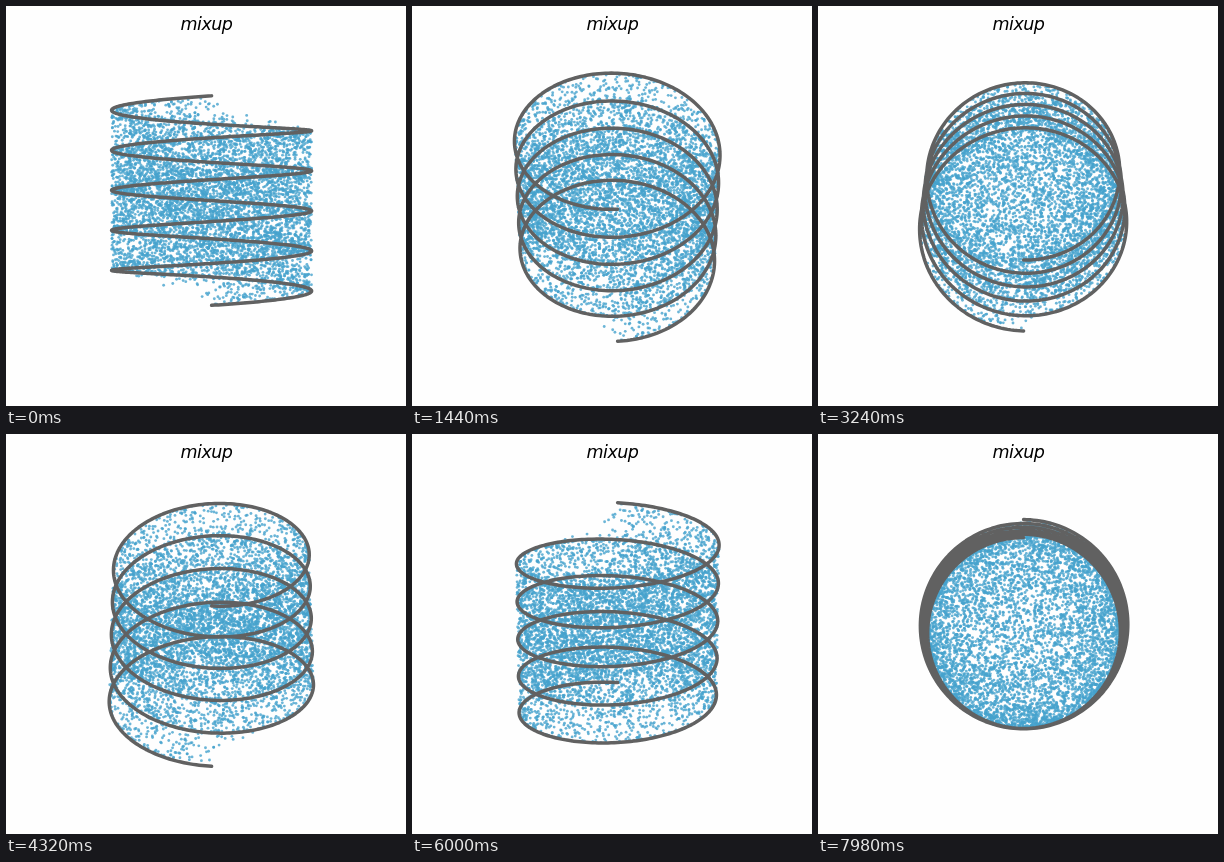
Recreate the animation shown at these times as an HTML page with a canvas. Size 400 by 400 pixels, loop 8000 ms.

```html
<!DOCTYPE html>
<html>
<head>
<meta charset="utf-8">
<title>mixup</title>
<style>
  html, body { margin: 0; width: 100%; height: 100%; overflow: hidden; background: #fefefe; }
  canvas { display: block; width: 400px; height: 400px; }
</style>
</head>
<body>
<canvas id="stage" width="400" height="400"></canvas>
<script>
const ctx = document.getElementById('stage').getContext('2d');
const LOOP = 8000, STEP = 60;
const ELEVATION_STEP = 2 * Math.PI / 179;
const CENTER_X = 205.6, CENTER_Y = 194.6, RADIUS = 99.9;
const PERSPECTIVE = 0.0461;
const TURNS = 5, POINTS = 7000, DOT_RADIUS = 1.42;

let seed = 12345;
function random() {
  seed = (seed * 1664525 + 1013904223) % 4294967296;
  return seed / 4294967296;
}

// Helix point for u in 0..1: [right, toward the viewer, up]
function helix(u) {
  const angle = u * TURNS * 2 * Math.PI;
  return [Math.sin(angle), Math.cos(angle), 2 * u - 1];
}

// Every dot is a random blend of two random helix points
function mixedPoint() {
  const a = helix(random()), b = helix(random()), mix = random();
  return a.map((v, i) => v * mix + b[i] * (1 - mix));
}

const curve = Array.from({ length: 1001 }, (_, i) => helix(i / 1000));
const dots = Array.from({ length: POINTS }, mixedPoint);

function projector(elevation) {
  const c = Math.cos(elevation), s = Math.sin(elevation);
  return ([x, y, z]) => {
    const scale = RADIUS / (1 - PERSPECTIVE * (y * c + z * s));
    return [CENTER_X + x * scale, CENTER_Y - (z * c - y * s) * scale];
  };
}

function draw(time) {
  const project = projector(Math.floor(time / STEP) * ELEVATION_STEP);
  ctx.fillStyle = '#fefefe';
  ctx.fillRect(0, 0, 400, 400);

  ctx.fillStyle = 'rgba(70, 162, 205, 0.8)';
  for (const [x, y] of dots.map(project)) {
    ctx.beginPath();
    ctx.arc(x, y, DOT_RADIUS, 0, 2 * Math.PI);
    ctx.fill();
  }

  ctx.strokeStyle = '#616161';
  ctx.lineWidth = 3.5;
  ctx.lineCap = ctx.lineJoin = 'round';
  ctx.beginPath();
  for (const [x, y] of curve.map(project)) ctx.lineTo(x, y);
  ctx.stroke();

  ctx.fillStyle = '#000';
  ctx.font = 'italic 17.5px "DejaVu Sans", sans-serif';
  ctx.letterSpacing = '-0.5px';
  ctx.textAlign = 'center';
  ctx.fillText('mixup', 200.5, 24);
}

function tick() {
  draw(performance.now() % LOOP);
  requestAnimationFrame(tick);
}
tick();
</script>
</body>
</html>
```
